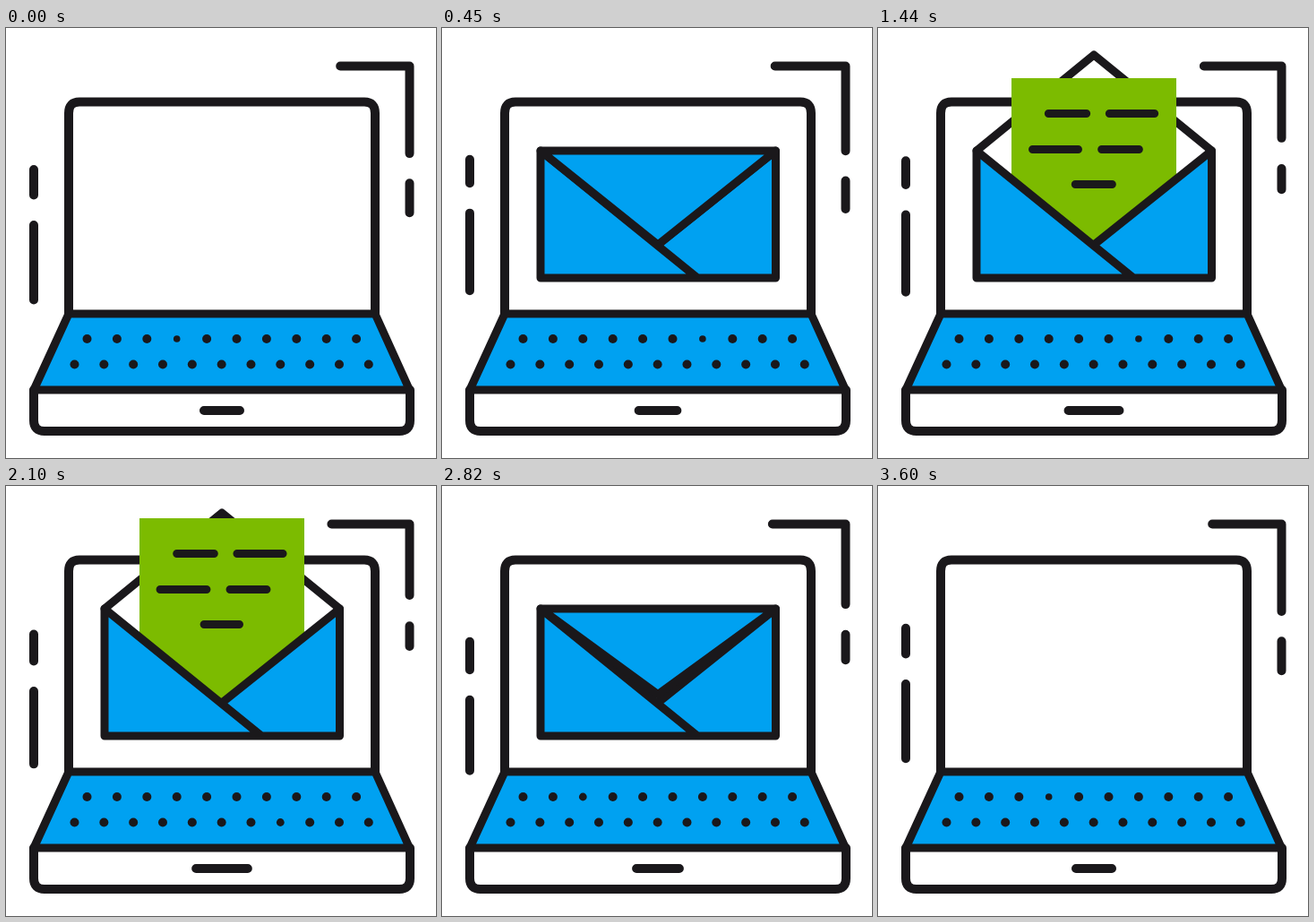
Recreate the animation shown at these times as an HTML page. Size 480 px wide and 480 px high, loop 3630 ms.

```html
<!DOCTYPE html>
<html lang="en">
<head>
<meta charset="utf-8">
<title>Laptop mail</title>
<style>
  html, body { margin: 0; width: 100%; height: 100%; overflow: hidden; background: #fff; }
  svg { display: block; width: 100vw; height: 100vh; }
  .line { fill: none; stroke: #1a181b; stroke-width: 10; stroke-linecap: round; stroke-linejoin: round; }
  .thin { stroke-width: 9; }
  .blue { fill: #00a1f1; }
  .white { fill: #fff; }
</style>
</head>
<body>
<svg viewBox="0 0 480 480">
  <path class="line" d="M70 319V95Q70 82.5 82 82.5H400Q412 82.5 412 95V319"/>
  <path class="line thin blue" d="M70 319H412L450.500 404H31Z"/>
  <path class="line" d="M31 404V438Q31 450 43 450H439Q451 450 451 438V404"/>
  <g id="keys" fill="#1a181b"></g>
  <path id="marks" class="line"/>
  <g id="mail">
    <path id="back" class="white"/>
    <path id="lid" class="line thin"/>
    <g id="letter">
      <path id="paper" fill="#7cbb00"/>
      <path id="text" class="line thin"/>
    </g>
    <path class="blue" d="M110 137L241 242L372.500 137V279H110Z"/>
    <path class="line thin" stroke-linecap="butt" d="M110 137V279H372.500V137L241 242M110 137L284 278"/>
    <path id="flap" class="line thin blue"/>
  </g>
</svg>
<script>
const LOOP = 3630;
const $ = id => document.getElementById(id);
const set = (id, d) => $(id).setAttribute('d', d);
const show = (id, on) => $(id).setAttribute('visibility', on ? 'inherit' : 'hidden');

const clamp = x => Math.min(1, Math.max(0, x));
const ramp = (t, a, b) => clamp((t - a) / (b - a));
const smooth = x => 0.5 - 0.5 * Math.cos(Math.PI * x);
const mix = (a, b, p) => a + (b - a) * p;

// Keyboard: a row of ten keys above a row of eleven
const keys = [];
function addRow(n, x, y, gap) {
  for (let i = 0; i < n; i++) {
    const c = document.createElementNS('http://www.w3.org/2000/svg', 'circle');
    c.setAttribute('cx', x + i * gap);
    c.setAttribute('cy', y);
    $('keys').appendChild(c);
    keys.push(c);
  }
}
addRow(10, 90.5, 347, 33.4);
addRow(11, 76.5, 375.5, 32.83);

const TYPED = [3, 17, 8, 12, 14, 6, 19, 3, 10, 2, 0];
const BEAT = 90;

function drawKeys(t) {
  const beat = Math.round(t / BEAT);
  const press = Math.cos(Math.PI * (t / BEAT - beat));
  const active = TYPED[beat % TYPED.length];
  keys.forEach((k, i) => k.setAttribute('r', i === active ? 5 - 1.2 * press : 5));
}

const vert = (x, a, b) => `M${x} ${a}V${b}`;
const dash = (x, y, half) => `M${x - half} ${y}H${x + half}`;

function drawMarks(c, s) {
  set('marks',
    vert(31, 158 - 16 * s, 186.5 - 19 * s) +
    vert(31, 220 - 19 * s, 303.5 - 14.5 * s) +
    `M${368 + 5.2 * c} 42.5H450.500V${130.5 + 9.6 * c}` +
    vert(450.5, 164.2 + 9 * c, 191.7 + 14.5 * c) +
    dash(241, 427, 24.7 - 4.7 * c));
}

function letterTop(t) {
  if (t < 900) return mix(142, 69, Math.sin(ramp(t, 660, 900) * Math.PI / 2));
  if (t < 1440) return mix(69, 56, ramp(t, 900, 1440));
  if (t < 2180) return mix(56, 36, ramp(t, 1440, 2100));
  return mix(36, 142, smooth(ramp(t, 2180, 2520)));
}

function drawMail(t, c) {
  const size = smooth(ramp(t, 60, 400)) * (1 - smooth(ramp(t, 2900, 3270)));
  show('mail', size > 0.005);
  $('mail').setAttribute('transform',
    `translate(241 208) scale(${Math.max(size, 0.001)}) translate(-241 -208)`);

  const open = smooth(ramp(t, 560, 830)) * (1 - smooth(ramp(t, 2500, 2870)));
  const tip = mix(242, 30, open);
  const up = tip < 137;
  const sides = `M110 137L241 ${tip}L372.500 137`;
  set('back', `M110 137L241 ${Math.min(tip, 137)}L372.500 137L241 242Z`);
  set('lid', sides);
  set('flap', sides + 'Z');
  show('lid', up);
  show('flap', !up);

  const y = letterTop(t);
  show('letter', up);
  set('paper', `M149 ${y}H333V270H149Z`);
  set('text',
    dash(211.5, y + 39.5, 24.5 + 4.2 * c) +
    dash(283.5, y + 39.5, 21.5 - 4.6 * c) +
    dash(198, y + 79.5, 21 - 5.6 * c) +
    dash(270.5, y + 79.5, 24.5 + 4.6 * c) +
    dash(240.8, y + 118.5, 28.5 + 10 * c));
}

function draw(now) {
  const t = now % LOOP;
  const a = t / LOOP * 2 * Math.PI;
  drawKeys(t);
  drawMarks(Math.cos(a), Math.sin(a));
  drawMail(t, Math.cos(a));
}

let start;
function tick(now) {
  if (start === undefined) start = now;
  draw(Math.max(0, now - start));
  requestAnimationFrame(tick);
}
draw(0);
requestAnimationFrame(tick);
</script>
</body>
</html>
```
